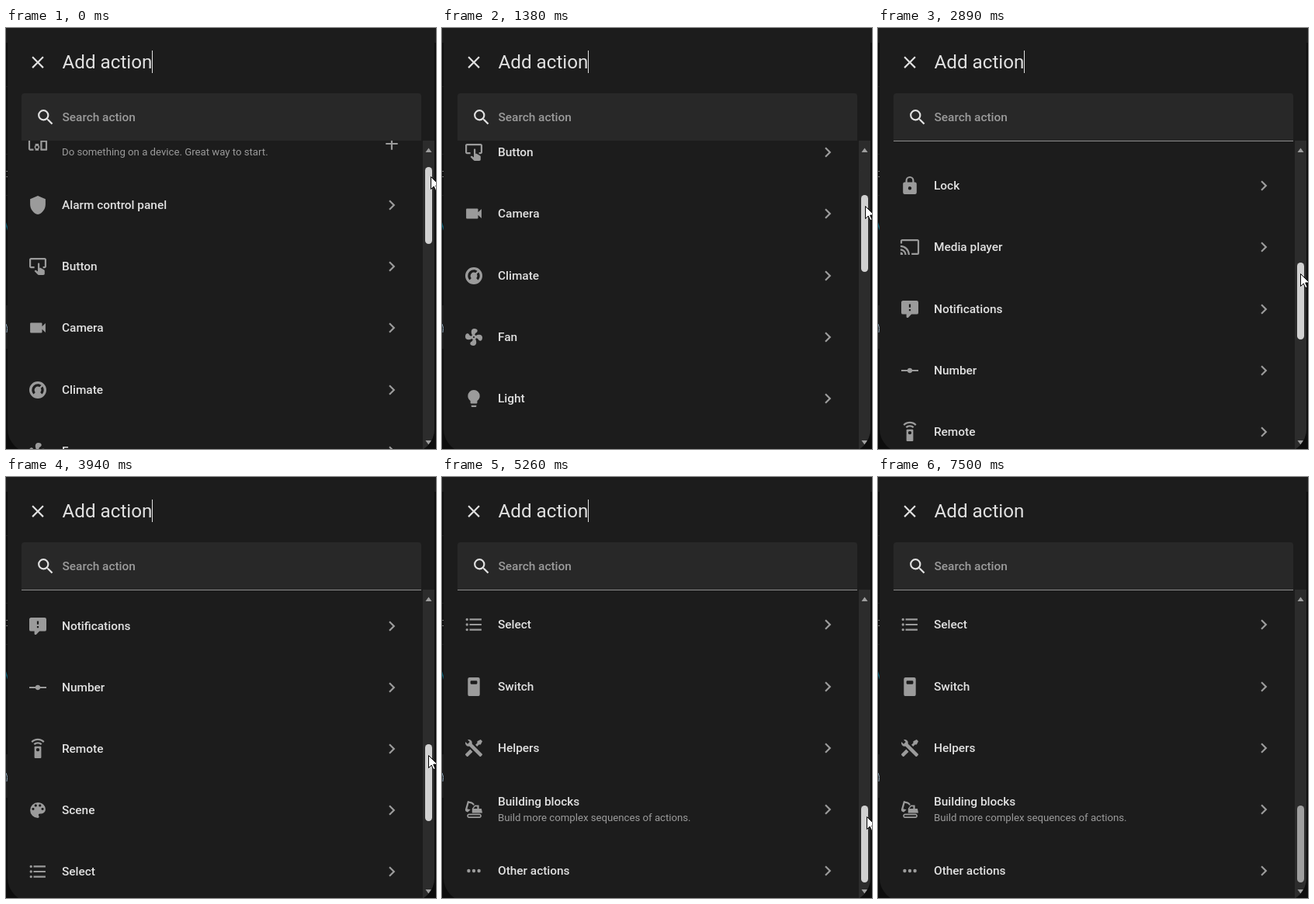
An HTML page for the animation above (7930 ms loop, 554 by 542 pixels).

```html
<!DOCTYPE html>
<html lang="en">
<head>
<meta charset="utf-8">
<title>Add action</title>
<style>
  html, body { margin: 0; width: 100%; height: 100%; overflow: hidden; background: #101010; }
  svg { display: block; width: 554px; height: 542px; font-family: Roboto, sans-serif; }
  .icon { fill: #9b9b9b; fill-rule: nonzero; }
  .bright { fill: #e1e1e1; }
  .label { font-size: 15.4px; font-weight: 500; fill: #e1e1e1; }
  .sub { font-size: 13.2px; fill: #9b9b9b; }
</style>
</head>
<body>
<svg id="stage" viewBox="0 0 554 542">
  <defs>
    <clipPath id="dialogClip"><rect x="2" y="-40" width="550" height="587" rx="31"/></clipPath>
    <clipPath id="listClip"><rect x="2" y="145" width="535" height="397"/></clipPath>
  </defs>
  <rect width="554" height="542" fill="#0d0d0d"/>
  <rect width="554" height="19" fill="#1c1c1c"/>
  <g fill="#1c1c1c">
    <rect y="75" width="2" height="1"/>
    <rect y="162" width="2" height="1"/>
    <rect y="215" width="2" height="1"/>
    <rect y="357" width="2" height="56"/>
  </g>
  <path d="M2 184.500H.5M2 191.500H.5" stroke="#8a8a8a"/>
  <path d="M0 250L2 256V261L0 255Z" fill="#0b5a70"/>
  <path d="M0 381Q3 386 1 392" fill="none" stroke="#8ba5b8"/>
  <g clip-path="url(#dialogClip)">
    <rect x="2" y="-40" width="550" height="587" fill="#1c1c1c"/>
    <g id="list" clip-path="url(#listClip)"></g>
    <rect x="537" y="145" width="15" height="397" fill="#2c2c2c"/>
    <path d="M540.500 160L544.500 154.500L548.500 160ZM540.500 531L544.500 536.500L548.500 531Z" fill="#9f9f9f"/>
    <rect id="thumb" x="540" width="9" height="99" rx="4.500"/>
  </g>
  <path d="M20 145V88Q20 84 24 84H531Q535 84 535 88V145Z" fill="#282828"/>
  <rect id="line" x="20" y="145" width="515" height="1" fill="#8c8c8c"/>
  <g id="header"></g>
  <text x="72.500" y="52" font-size="24.200" fill="#e1e1e1">Add action</text>
  <text x="72.500" y="120" class="label" style="fill:#9b9b9b">Search action</text>
  <rect id="caret" x="188" y="29" width="1" height="29" fill="#e1e1e1"/>
  <path id="pointer" d="M.5 .5V16.500L4.200 13L6.800 18.700L9.200 17.600L6.700 12H12Z" fill="#fff" stroke="#000"/>
</svg>
<script>
const LOOP = 7930;
const ROW_PITCH = 79.2;
const FIRST_ROW = 148.8;
const SCROLL_PER_PIXEL = 4.05;

const dot = (x, y, r) => `M${x - r},${y}a${r},${r} 0 1,0 ${2 * r},0a${r},${r} 0 1,0 ${-2 * r},0Z`;

const icons = {
  close: 'M19,6.41L17.59,5L12,10.59L6.41,5L5,6.41L10.59,12L5,17.59L6.41,19L12,13.41L17.59,19L19,17.59L13.41,12Z',
  search: 'M9.5,3A6.5,6.5 0 0,1 16,9.5C16,11.11 15.41,12.59 14.44,13.73L14.71,14H15.5L20.5,19L19,20.5L14,15.5V14.71L13.73,14.44C12.59,15.41 11.11,16 9.5,16A6.5,6.5 0 0,1 3,9.5A6.5,6.5 0 0,1 9.5,3M9.5,5C7,5 5,7 5,9.5C5,12 7,14 9.5,14C12,14 14,12 14,9.5C14,7 12,5 9.5,5Z',
  plus: 'M19,13H13V19H11V13H5V11H11V5H13V11H19Z',
  chevron: 'M8.59,16.58L13.17,12L8.59,7.41L10,6L16,12L10,18Z',
  devices: 'M3 6H21V4H3C1.9 4 1 4.9 1 6V18C1 19.1 1.9 20 3 20H7V18H3V6M13 12H9V13.78C8.39 14.33 8 15.11 8 16C8 16.89 8.39 17.67 9 18.22V20H13V18.22C13.61 17.67 14 16.88 14 16S13.61 14.33 13 13.78V12M11 17.5C10.17 17.5 9.5 16.83 9.5 16S10.17 14.5 11 14.5 12.5 15.17 12.5 16 11.83 17.5 11 17.5M22 8H16C15.5 8 15 8.5 15 9V19C15 19.5 15.5 20 16 20H22C22.5 20 23 19.5 23 19V9C23 8.5 22.5 8 22 8M21 18H17V10H21V18Z',
  shield: 'M12,1L3,5V11C3,16.55 6.84,21.74 12,23C17.16,21.74 21,16.55 21,11V5Z',
  tap: 'M20 20.5C20 21.3 19.3 22 18.5 22H13C12.6 22 12.3 21.9 12 21.6L8 17.4L8.7 16.6C8.9 16.4 9.2 16.3 9.5 16.3H9.7L12 18V9C12 8.4 12.4 8 13 8S14 8.4 14 9V13.5L15.2 13.6L19.1 15.8C19.6 16 20 16.6 20 17.1V20.5M20 2H4C2.9 2 2 2.9 2 4V12C2 13.1 2.9 14 4 14H8V12H4V4H20V12H18V14H20C21.1 14 22 13.1 22 12V4C22 2.9 21.1 2 20 2Z',
  video: 'M17,10.5V7A1,1 0 0,0 16,6H4A1,1 0 0,0 3,7V17A1,1 0 0,0 4,18H16A1,1 0 0,0 17,17V13.5L21,17.5V6.5Z',
  thermostat: 'M16.95,16.95L14.83,14.83C15.55,14.1 16,13.1 16,12C16,11.26 15.79,10.57 15.43,10L17.6,7.81C18.5,9 19,10.43 19,12C19,13.93 18.22,15.68 16.95,16.95M12,5C13.57,5 15,5.5 16.19,6.4L14,8.56C13.43,8.21 12.74,8 12,8A4,4 0 0,0 8,12C8,13.1 8.45,14.1 9.17,14.83L7.05,16.95C5.78,15.68 5,13.93 5,12A7,7 0 0,1 12,5M12,2A10,10 0 0,0 2,12A10,10 0 0,0 12,22A10,10 0 0,0 22,12A10,10 0 0,0 12,2Z',
  fan: 'M12,11A1,1 0 0,0 11,12A1,1 0 0,0 12,13A1,1 0 0,0 13,12A1,1 0 0,0 12,11M12.5,2C17,2 17.11,5.57 14.75,6.75C13.76,7.24 13.32,8.29 13.13,9.22C13.61,9.42 14.03,9.73 14.35,10.13C18.05,8.13 22.03,8.92 22.03,12.5C22.03,17 18.46,17.1 17.28,14.73C16.78,13.74 15.72,13.3 14.79,13.11C14.59,13.59 14.28,14 13.88,14.34C15.87,18.03 15.08,22 11.5,22C7,22 6.91,18.42 9.27,17.24C10.25,16.75 10.69,15.71 10.89,14.79C10.4,14.59 9.97,14.27 9.65,13.87C5.96,15.85 2,15.07 2,11.5C2,7 5.56,6.89 6.74,9.26C7.24,10.25 8.29,10.68 9.22,10.87C9.41,10.39 9.73,9.97 10.14,9.65C8.15,5.96 8.94,2 12.5,2Z',
  bulb: 'M12,2A7,7 0 0,0 5,9C5,11.38 6.19,13.47 8,14.74V17A1,1 0 0,0 9,18H15A1,1 0 0,0 16,17V14.74C17.81,13.47 19,11.38 19,9A7,7 0 0,0 12,2M9,21A1,1 0 0,0 10,22H14A1,1 0 0,0 15,21V20H9Z',
  lock: 'M12,17A2,2 0 0,0 14,15C14,13.89 13.1,13 12,13A2,2 0 0,0 10,15A2,2 0 0,0 12,17M18,8A2,2 0 0,1 20,10V20A2,2 0 0,1 18,22H6A2,2 0 0,1 4,20V10C4,8.89 4.9,8 6,8H7V6A5,5 0 0,1 12,1A5,5 0 0,1 17,6V8H18M12,3A3,3 0 0,0 9,6V8H15V6A3,3 0 0,0 12,3Z',
  cast: 'M1,10V12A9,9 0 0,1 10,21H12C12,14.92 7.07,10 1,10M1,14V16A5,5 0 0,1 6,21H8A7,7 0 0,0 1,14M1,18V21H4A3,3 0 0,0 1,18M21,3H3C1.89,3 1,3.89 1,5V8H3V5H21V19H14V21H21A2,2 0 0,0 23,19V5C23,3.89 22.1,3 21,3Z',
  comment: 'M9,22A1,1 0 0,1 8,21V18H4A2,2 0 0,1 2,16V4C2,2.89 2.9,2 4,2H20A2,2 0 0,1 22,4V16A2,2 0 0,1 20,18H13.9L10.2,21.71C10,21.9 9.75,22 9.5,22H9M13,10V6H11V10H13M13,14V12H11V14H13Z',
  slider: 'M2,11H9.17C9.58,9.83 10.69,9 12,9C13.31,9 14.42,9.83 14.83,11H22V13H14.83C14.42,14.17 13.31,15 12,15C10.69,15 9.58,14.17 9.17,13H2Z',
  remote: 'M12,0C8.96,0 6.21,1.23 4.22,3.22L5.63,4.63C7.26,3 9.5,2 12,2C14.5,2 16.74,3 18.36,4.64L19.77,3.23C17.79,1.23 15.04,0 12,0M7.05,6.05L8.46,7.46C9.37,6.56 10.62,6 12,6C13.38,6 14.63,6.56 15.54,7.46L16.95,6.05C15.68,4.78 13.93,4 12,4C10.07,4 8.32,4.78 7.05,6.05M12,15A2,2 0 0,1 10,13A2,2 0 0,1 12,11A2,2 0 0,1 14,13A2,2 0 0,1 12,15M15,9H9A1,1 0 0,0 8,10V22A1,1 0 0,0 9,23H15A1,1 0 0,0 16,22V10A1,1 0 0,0 15,9Z',
  palette: 'M12,3A9,9 0 0,0 3,12A9,9 0 0,0 12,21A1.5,1.5 0 0,0 13.5,19.5C13.5,19.11 13.35,18.76 13.11,18.5C12.88,18.23 12.73,17.88 12.73,17.5A1.5,1.5 0 0,1 14.23,16H16A5,5 0 0,0 21,11C21,6.58 16.97,3 12,3Z'
    + dot(6.5, 10.5, 1.5) + dot(9.5, 6.5, 1.5) + dot(14.5, 6.5, 1.5) + dot(17.5, 10.5, 1.5),
  bullets: [6, 12, 18].map(y => dot(4, y, 1.5) + `M7,${y - 1}H21V${y + 1}H7Z`).join(''),
  toggle: 'M7,1H17A2,2 0 0,1 19,3V21A2,2 0 0,1 17,23H7A2,2 0 0,1 5,21V3A2,2 0 0,1 7,1M9,5A1,1 0 0,0 8,6V8A1,1 0 0,0 9,9H15A1,1 0 0,0 16,8V6A1,1 0 0,0 15,5Z',
  tools: 'M21.71 20.29L20.29 21.71A1 1 0 0 1 18.88 21.71L7 9.85A3.81 3.81 0 0 1 6 10A4 4 0 0 1 2.22 4.7L4.76 7.24L5.29 6.71L6.71 5.29L7.24 4.76L4.7 2.22A4 4 0 0 1 10 6A3.81 3.81 0 0 1 9.85 7L21.71 18.88A1 1 0 0 1 21.71 20.29M2.29 18.88A1 1 0 0 0 2.29 20.29L3.71 21.71A1 1 0 0 0 5.12 21.71L10.59 16.25L7.76 13.42M20 2L16 4V6L13.83 8.17L15.83 10.17L18 8H20L22 4Z',
  excavator: 'M18.5 18.5C19.04 18.5 19.5 18.96 19.5 19.5S19.04 20.5 18.5 20.5H6.5C5.96 20.5 5.5 20.04 5.5 19.5S5.96 18.5 6.5 18.5H18.5M18.5 17H6.5C5.13 17 4 18.13 4 19.5S5.13 22 6.5 22H18.5C19.88 22 21 20.88 21 19.5S19.88 17 18.5 17M21 11H18V7H13L10 11V16H22L21 11M11.54 11L13.5 8.5H16V11H11.54M9.76 3.41L4.76 2L2 11.83C1.66 13.11 2.41 14.44 3.7 14.8L4.86 15.12L8.15 12.29L4.27 11.21L6.15 4.46L8.94 5.24C9.5 5.53 10.71 6.34 11.47 7.37L12.5 6H12.94C11.68 4.41 9.85 3.46 9.76 3.41Z',
  dots: dot(6, 12, 2) + dot(12, 12, 2) + dot(18, 12, 2)
};

const rows = [
  ['devices', 'Device', 'Do something on a device. Great way to start.'],
  ['shield', 'Alarm control panel'], ['tap', 'Button'], ['video', 'Camera'],
  ['thermostat', 'Climate'], ['fan', 'Fan'], ['bulb', 'Light'], ['lock', 'Lock'],
  ['cast', 'Media player'], ['comment', 'Notifications'], ['slider', 'Number'],
  ['remote', 'Remote'], ['palette', 'Scene'], ['bullets', 'Select'],
  ['toggle', 'Switch'], ['tools', 'Helpers'],
  ['excavator', 'Building blocks', 'Build more complex sequences of actions.'],
  ['dots', 'Other actions']
];

// [time, scroll offset]: the drag advances in discrete jumps
const drag = [
  [0, 0], [120, 4], [240, 10], [360, 20], [480, 36], [630, 65], [750, 97], [900, 149],
  [1020, 147], [1140, 145], [1260, 145], [1380, 147], [1650, 190], [1770, 265], [1890, 343],
  [2040, 371], [2190, 379], [2340, 405], [2490, 433], [2770, 468], [2890, 500], [3010, 528],
  [3130, 548], [3280, 570], [3430, 592], [3550, 611], [3670, 630], [3820, 652], [3940, 670],
  [4060, 703], [4180, 738], [4330, 779], [4450, 749], [4600, 772], [4750, 808], [4870, 855],
  [4990, 906], [5140, 978], [5260, 988]
];
// [time, x, y]: the pointer leaves after the drag
const leave = [
  [5510, 548, 443], [5630, 549, 454], [5750, 550, 466], [5870, 551, 477],
  [6020, 552, 486], [6150, 553, 495]
];

const $ = id => document.getElementById(id);
const at = (steps, t) => steps.findLast(step => step[0] <= t);
const icon = (name, x, y, cls = '') =>
  `<path class="icon ${cls}" d="${icons[name]}" fill-rule="evenodd" style="fill-rule:evenodd" transform="translate(${x - 13.2} ${y - 13.2}) scale(1.1)"/>`;

$('header').innerHTML = icon('close', 41, 44.2, 'bright') + icon('search', 51, 115, 'bright');
$('list').innerHTML = rows.map(([name, label, sub]) => `<g>
  ${icon(name, 41, 0)}${icon(name === 'devices' ? 'plus' : 'chevron', 497, 0)}
  <text class="label" x="72" y="${sub ? -5 : 5}">${label}</text>
  ${sub ? `<text class="sub" x="72" y="15">${sub}</text>` : ''}</g>`).join('');
const rowNodes = [...$('list').children];

function pointerX(t) {
  if (t < 900) return t < 480 ? 547 : 546;
  if (t < 1140) return 546;
  if (t < 1650) return 545;
  return t < 4750 ? 544 : t < 4990 ? 545 : t < 5260 ? 546 : 547;
}

function render(t) {
  const scroll = at(drag, t)[1];
  const shift = Math.round(scroll / SCROLL_PER_PIXEL);
  rowNodes.forEach((node, i) => {
    const y = Math.round(FIRST_ROW + i * ROW_PITCH - scroll);
    node.setAttribute('transform', `translate(0 ${y})`);
  });
  $('thumb').setAttribute('y', 179 + shift);
  $('thumb').setAttribute('fill', t < 6020 ? '#d1d1d1' : '#9f9f9f');
  $('line').setAttribute('visibility', t < 2770 ? 'hidden' : 'visible');

  const gone = at(leave, t);
  const x = gone ? gone[1] : pointerX(t);
  const y = gone ? gone[2] : (t < 120 ? 191 : 193) + shift;
  $('pointer').setAttribute('transform', `translate(${x} ${y})`);
  $('pointer').setAttribute('visibility', t < 6300 ? 'visible' : 'hidden');

  const caretOn = t < 6450 || (t >= 6880 && t < 7500);
  $('caret').setAttribute('visibility', caretOn ? 'visible' : 'hidden');
}

const start = performance.now();
function tick() {
  render((performance.now() - start) % LOOP);
  requestAnimationFrame(tick);
}
tick();
</script>
</body>
</html>
```
